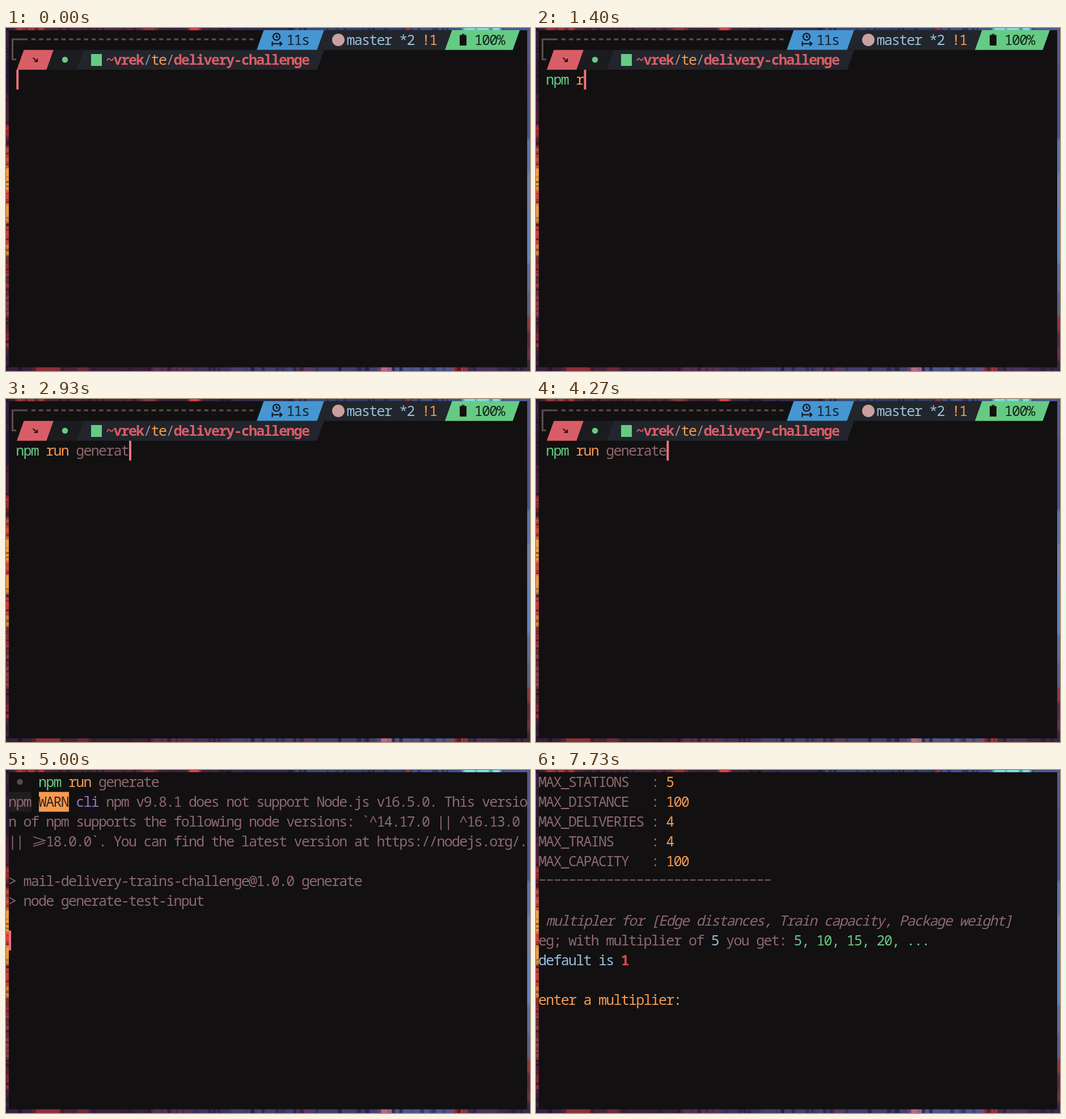
Animation, 924 px wide and 606 px high, one loop 8000 ms. Source, as an HTML page with a canvas:

```html
<!DOCTYPE html>
<html lang="en">
<head>
<meta charset="utf-8">
<title>Terminal session</title>
<style>
  html, body { margin: 0; width: 100%; height: 100%; overflow: hidden; background: #121011; }
  canvas { display: block; }
</style>
</head>
<body>
<canvas id="stage" width="924" height="606"></canvas>
<script>
const ctx = document.getElementById('stage').getContext('2d');
const LOOP = 8000, LEFT = 5, TOP = 3.7, CELL = 13.25, ROW = 35;
const RED = '#d95d66', GREEN = '#65cb84', ORANGE = '#f59a50', BLUE = '#96bfd8',
      GREY = '#8c686e', DIM = '#5c4b4c', INK = '#121011', PANEL = '#22252c', CURSOR = '#ed737c';

const COMMAND = 'npm run generate';
const KEY_TIMES = [400, 670, 930, 1130, 1330, 1470, 1670, 1870, 2000, 2200, 2330, 2470, 2670, 2800, 2930, 3130];
const VALID_AT = 1000, ENTER_AT = 4600, WARN_AT = 5000, CLEAR_AT = 5070, HIDE_CURSOR_AT = 7730;

const colX = col => LEFT + col * CELL;
const rowY = row => TOP + row * ROW;

function rect(x, y, w, h, color) {
  ctx.fillStyle = color;
  ctx.fillRect(x, y, w, h);
}

function disc(x, y, r, color) {
  ctx.fillStyle = color;
  ctx.beginPath();
  ctx.arc(x, y, r, 0, 7);
  ctx.fill();
}

function line(points, color, width) {
  ctx.strokeStyle = color;
  ctx.lineWidth = width;
  ctx.beginPath();
  points.forEach(([x, y]) => ctx.lineTo(x, y));
  ctx.stroke();
}

// One character per cell; returns the column after the text.
function put(row, col, text, color, style = '300') {
  ctx.font = `${style} semi-condensed 25px "Noto Sans Mono", "DejaVu Sans Mono", monospace`;
  ctx.textAlign = 'center';
  ctx.fillStyle = color;
  for (const ch of text) ctx.fillText(ch, colX(col++) + CELL / 2, rowY(row) + 26.3);
  return col;
}

function cursor(row, col) {
  rect(colX(col), rowY(row), 4, ROW, CURSOR);
}

function segment(row, x1, x2, color) {
  const y = rowY(row);
  ctx.fillStyle = color;
  ctx.beginPath();
  ctx.moveTo(x1, y);
  ctx.lineTo(x2, y);
  ctx.lineTo(x2 - 12.5, y + ROW);
  ctx.lineTo(x1 - 12.5, y + ROW);
  ctx.fill();
}

// Stops are "position colour" pairs; each colour holds until shortly before the next.
function strip(x, y, w, h, spec) {
  const length = Math.max(w, h);
  const gradient = ctx.createLinearGradient(x, y, w > h ? x + w : x, w > h ? y : y + h);
  const stops = spec.split(',').map(s => s.trim().split(' '));
  stops.forEach(([pos, color], i) => {
    gradient.addColorStop(pos / length, color);
    const end = i + 1 < stops.length ? stops[i + 1][0] - 8 : length;
    gradient.addColorStop(Math.max(pos, end) / length, color);
  });
  rect(x, y, w, h, gradient);
}

// Fine dark streaks across the wallpaper edges
function streaks() {
  let seed = 7;
  const random = () => (seed = seed * 16807 % 2147483647) / 2147483647;
  for (let i = 0; i < 150; i++) {
    const shade = `rgba(24, 14, 30, ${random() * 0.5})`;
    rect(random() * 924, random() < 0.5 ? 0 : 599, 2 + random() * 5, 7, shade);
    rect(0, random() * 606, 5, 1 + random() * 3, shade);
  }
}

function wallpaper() {
  strip(0, 0, 5, 606, '0 #35203a, 60 #2b1b35, 120 #4a2136, 176 #a8323a, 195 #5a2030, 215 #c9503a, 250 #f0a040, 290 #d84a3c, 315 #e89a44, 350 #c8403c, 385 #d8803c, 410 #a8383c, 440 #8a3f48, 515 #5a2434, 545 #8a2c38, 570 #38203a');
  strip(919, 0, 5, 606, '0 #505a90, 70 #4a548c, 130 #465490, 200 #5876ac, 260 #6d80b4, 330 #5686c4, 420 #5c6c9c, 470 #58608e, 514 #903444, 540 #5a2a48, 570 #6a304a, 590 #3a2748');
  strip(0, 0, 924, 4, '0 #35203a, 22 #a0363e, 76 #4a2638, 150 #52283a, 245 #8a3440, 272 #3a2238, 326 #d84048, 346 #3a2640, 400 #302c4c, 508 #3a4674, 600 #343e6c, 706 #803850, 718 #40528a, 810 #80dce0, 876 #4a5890');
  strip(0, 599, 924, 7, '0 #38203a, 52 #8a303c, 100 #4a2438, 130 #6a2c3c, 150 #3a2038, 262 #583050, 330 #40305a, 400 #46406c, 520 #5a3a60, 545 #443e6c, 662 #b46a8c, 684 #505488, 792 #b03844, 816 #4a3458, 870 #3a2848');
  streaks();
  rect(LEFT, 4, 914, 595.5, INK);
}

function promptFrame() {
  line([[38, 20], [11.5, 20], [11.5, 55.5], [18, 55.5]], DIM, 3.2);
  for (let col = 3; col < 33; col++) rect(colX(col), 18.4, 7.5, 3.2, DIM);
}

function clockIcon() {
  ctx.strokeStyle = INK;
  ctx.lineWidth = 2.2;
  ctx.beginPath();
  ctx.arc(477, 15.5, 6, 0, 7);
  ctx.stroke();
  line([[477, 12], [477, 16], [480, 16]], INK, 1.8);
  line([[469.5, 23.5], [469.5, 32]], INK, 2);
  line([[470, 27.8], [486, 27.8]], INK, 2);
  line([[482.5, 24], [486.5, 27.8], [482.5, 31.6]], INK, 2);
}

function prompt() {
  promptFrame();
  segment(0, 454.5, 561, '#4596d2');
  segment(0, 561, 786.5, PANEL);
  segment(0, 786.5, 906, GREEN);
  clockIcon();
  put(0, 37, '11s', '#18222c');
  disc(586, 21, 11, '#c9a09f');
  put(0, 45, 'master *2', BLUE);
  put(0, 55, '!1', ORANGE);
  rect(800, 12.5, 12, 18.5, INK);
  rect(803.5, 10.5, 5, 2, INK);
  put(0, 62, '100%', '#17251c');

  segment(1, 31.5, 84, RED);
  segment(1, 84, 137, '#1b1c20');
  segment(1, 137, 561, PANEL);
  line([[47.5, 52.5], [55, 59]], INK, 1.8);
  line([[55.2, 54], [55.2, 59.2], [49.8, 59.2]], INK, 1.8);
  disc(104, 56, 5.2, GREEN);
  rect(150, 46, 19, 21, GREEN);
  let col = put(1, 13, '~vrek', RED, '700');
  col = put(1, col, '/', '#a08a8e');
  col = put(1, col, 'te', ORANGE);
  col = put(1, col, '/', '#a08a8e');
  put(1, col, 'delivery-challenge', RED, '700');
}

function command(row, col, count, valid) {
  const typed = COMMAND.slice(0, count);
  put(row, col, typed.slice(0, 3), valid ? GREEN : '#e0474f', valid ? '300' : '700');
  put(row, col + 4, typed.slice(4, 7), ORANGE);
  put(row, col + 8, typed.slice(8), GREY);
}

function typing(t) {
  const count = KEY_TIMES.filter(k => k <= t).length;
  prompt();
  command(2, 1, count, t >= VALID_AT);
  cursor(2, 1 + count);
}

function entered() {
  disc(24.5, 21, 5.2, DIM);
  command(0, 4, COMMAND.length, true);
}

function warning() {
  entered();
  rect(LEFT, rowY(1), 3 * CELL, ROW, '#211d1f');
  rect(colX(4), rowY(1), 4 * CELL, ROW, ORANGE);
  put(1, 0, 'npm', GREY);
  put(1, 4, 'WARN', '#3a2418');
  put(1, 9, 'cli', '#9a72c4');
  put(1, 13, 'npm v9.8.1 does not support Node.js v16.5.0. This versio', GREY);
  put(2, 0, 'n of npm supports the following node versions: `^14.17.0 || ^16.13.0', GREY);
  put(3, 0, '||', GREY);
  // Wide "greater or equal" ligature
  line([[48, 118], [68.5, 124.5], [48, 131]], GREY, 1.8);
  line([[48, 135], [69, 128.5]], GREY, 1.8);
  put(3, 5, '18.0.0`. You can find the latest version at https://nodejs.org/.', GREY);
  put(5, 0, '> mail-delivery-trains-challenge@1.0.0 generate', GREY);
  put(6, 0, '> node generate-test-input', GREY);
  cursor(8, 0);
}

function settings(t) {
  const limits = { STATIONS: 5, DISTANCE: 100, DELIVERIES: 4, TRAINS: 4, CAPACITY: 100 };
  Object.entries(limits).forEach(([name, value], row) => {
    put(row, 0, ('MAX_' + name).padEnd(15) + ':', GREY);
    put(row, 17, String(value), ORANGE);
  });
  for (let col = 0; col < 31; col++) rect(colX(col) + 1.5, 193.5, 10, 1.8, GREY);
  put(7, 1, 'multipler for [Edge distances, Train capacity, Package weight]', GREY, 'italic 300');
  put(8, 0, 'eg; with multiplier of', GREY);
  put(8, 23, '5', BLUE);
  put(8, 25, 'you get:', GREY);
  put(8, 34, '5, 10, 15, 20, ...', GREEN);
  put(9, 0, 'default is', BLUE);
  put(9, 11, '1', '#e0474f', '700');
  put(11, 0, 'enter a multiplier:', ORANGE);
  if (t < HIDE_CURSOR_AT) cursor(11, 20);
}

const start = performance.now();

function draw() {
  const t = (performance.now() - start) % LOOP;
  wallpaper();
  if (t < ENTER_AT) typing(t);
  else if (t < WARN_AT) { entered(); cursor(1, 0); }
  else if (t < CLEAR_AT) warning();
  else settings(t);
  requestAnimationFrame(draw);
}
draw();
</script>
</body>
</html>
```
